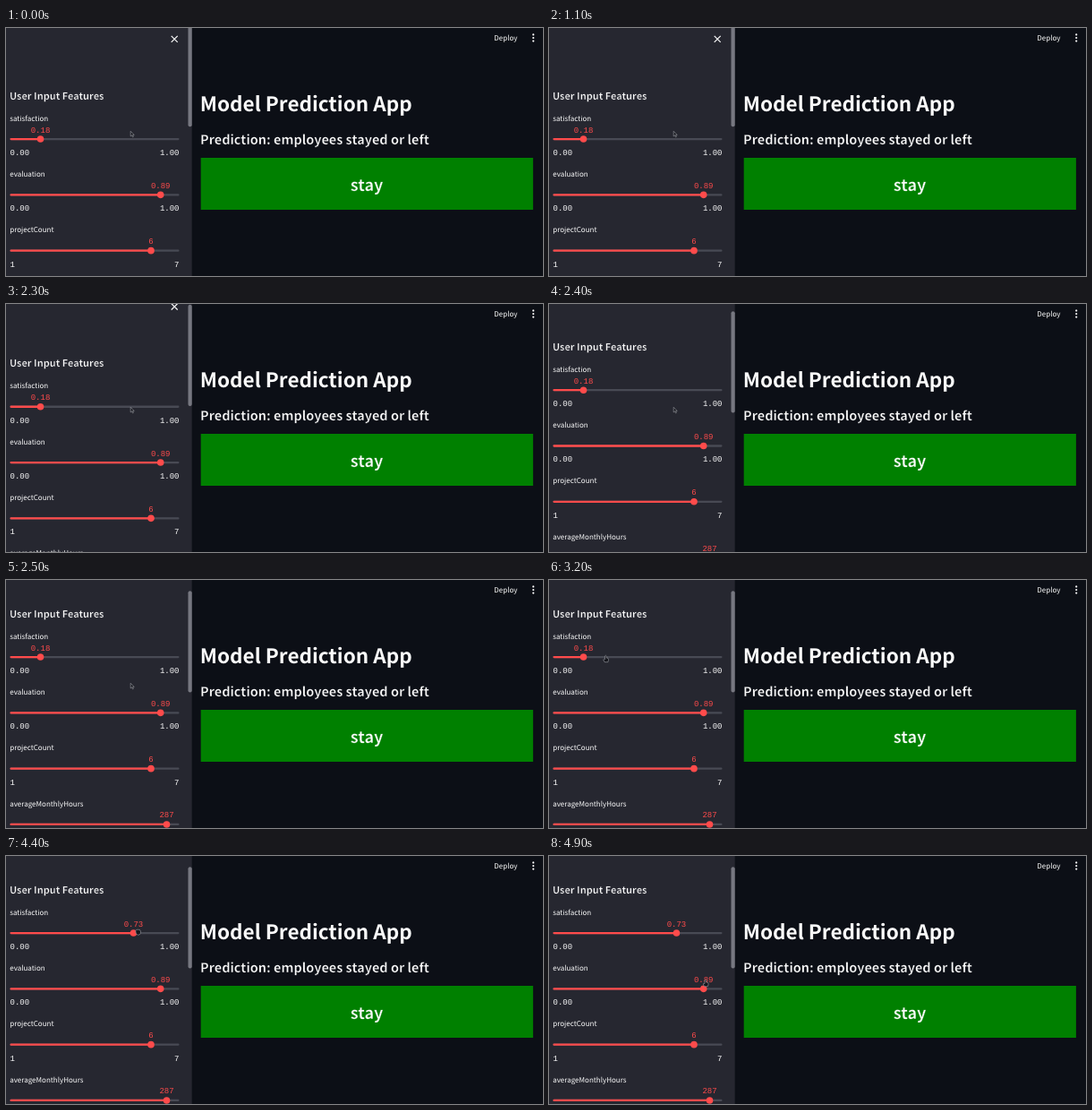
Recreate the animation shown at these times as an HTML page. Size 600 by 277 pixels, loop 5 s.

```html
<!DOCTYPE html>
<html lang="en">
<head>
<meta charset="utf-8">
<title>Model Prediction App</title>
<style>
  html, body { margin: 0; height: 100%; overflow: hidden; background: #0c0f16; }
  svg { display: block; width: 600px; height: 277px; }
  text {
    font: 8.03px "Noto Sans CJK JP", "Noto Sans CJK SC", "Open Sans", sans-serif;
    fill: #fafafa;
    text-rendering: geometricPrecision;
  }
  .bold { font-weight: 700; }
  /* Bold trimmed to semibold by a thin edge in the background colour */
  .semi { font-weight: 700; stroke-width: .3; }
  .mono { font: 9px "Liberation Mono", monospace; }
  .value { fill: #ff4b4b; text-anchor: middle; }
  .end { text-anchor: end; }
  .cursor { fill: #15161c; stroke: #a0a1a8; stroke-width: .6; stroke-linejoin: round; }
</style>
</head>
<body>
<svg viewBox="0 0 600 277">
  <rect width="600" height="277" fill="#0c0f16"/>
  <text x="545.3" y="14">Deploy</text>
  <g fill="#fafafa">
    <circle cx="589.2" cy="7.4" r="1.1"/>
    <circle cx="589.2" cy="11" r="1.1"/>
    <circle cx="589.2" cy="14.6" r="1.1"/>
  </g>
  <text class="bold" x="216.8" y="92.8" style="font-size:22.5px">Model Prediction App</text>
  <text class="semi" x="217" y="129.9" stroke="#0c0f16" style="font-size:14.46px">Prediction: employees stayed or left</text>
  <rect x="217.7" y="145" width="371.2" height="58" fill="#008000"/>
  <text class="semi" x="403.1" y="181.5" stroke="#008000" text-anchor="middle" style="font-size:18.1px">stay</text>

  <rect width="207.7" height="277" fill="#262730"/>
  <g id="panel">
    <path d="M184.7 8.8l7 7m0-7l-7 7" stroke="#fafafa" stroke-width="1.2"/>
    <text class="semi" x="4" y="79.7" stroke="#262730" style="font-size:10.95px">User Input Features</text>
  </g>
  <rect id="bar" x="203.5" y="-3" width="4.2" height="113.3" rx="2" fill="#777881"/>
  <path id="cursor" class="cursor"/>
</svg>
<script>
const LOOP = 5000, STEP = 100;
const LEFT = 4.5, WIDTH = 189, GAP = 62.3, SCROLL = 38;
const $ = id => document.getElementById(id);

const SHAPES = {
  arrow: "M0 0V5.6L1.4 4.5L2.3 6.5L3.2 6.1L2.3 4.1H4Z",
  hand: "M-1 1V-2.6Q-.2 -4 .6 -2.6V-.6L2.6 0Q3.2 .4 3 2L2.4 4.2H-1.4L-2.8 1.4Q-2.4 .4 -1 1Z",
  fist: "M-2.6 -1.4Q-2.2 -3 0 -2.8Q2.8 -3 3 -1V1.2Q2.4 3.2 0 3.2Q-2.8 2.8 -2.6 -1.4Z"
};

// Rows of time, cursor x, cursor y
const PATH = [
  [2700, 139.2, 115.3], [3200, 63.5, 87.5], [3300, 43, 85],
  [3900, 102, 85], [4400, 147.4, 85], [4500, 147.4, 85], [4900, 175, 141.5]
];
const DRAG = [[3300, .18], [3900, .49], [4400, .73]];

// Linear interpolation through keyed rows, held at both ends
function along(rows, t, col = 1) {
  if (t <= rows[0][0]) return rows[0][col];
  for (let i = 1; i < rows.length; i++) {
    const a = rows[i - 1], b = rows[i];
    if (t <= b[0]) return a[col] + (b[col] - a[col]) * (t - a[0]) / (b[0] - a[0]);
  }
  return rows[rows.length - 1][col];
}

function add(tag, attrs, label = "") {
  const el = document.createElementNS("http://www.w3.org/2000/svg", tag);
  for (const key in attrs) el.setAttribute(key, attrs[key]);
  el.textContent = label;
  return $("panel").appendChild(el);
}

function slider(row, name, min, max) {
  const y = row * GAP;
  const track = { x: LEFT, y: 122.9 + y, height: 2.3, rx: 1.1 };
  add("text", { x: 4.2, y: 103.7 + y }, name);
  add("rect", { ...track, width: WIDTH, fill: "#484a54" });
  const fill = add("rect", { ...track, fill: "#ff4b4b" });
  const knob = add("circle", { cy: 124.05 + y, r: 3.8, fill: "#ff4b4b" });
  const value = add("text", { class: "mono value", y: 116.5 + y });
  add("text", { class: "mono", x: LEFT, y: 142 + y }, min);
  add("text", { class: "mono end", x: LEFT + WIDTH, y: 142 + y }, max);
  return (part, label) => {
    const x = LEFT + part * WIDTH;
    fill.setAttribute("width", part * WIDTH);
    knob.setAttribute("cx", x);
    value.setAttribute("x", x);
    value.textContent = label;
  };
}

const satisfaction = slider(0, "satisfaction", "0.00", "1.00");
slider(1, "evaluation", "0.00", "1.00")(.89, "0.89");
slider(2, "projectCount", "1", "7")(5 / 6, "6");
slider(3, "averageMonthlyHours", "96", "310")(.926, "287");

function draw(now) {
  const t = Math.floor(now % LOOP / STEP) * STEP;

  const u = Math.min(1, Math.max(0, (t - 2205) / 295));
  const scroll = SCROLL * u * u * (3 - 2 * u);
  $("panel").setAttribute("transform", `translate(0 ${-scroll})`);
  $("bar").setAttribute("y", -3 + scroll * .4);

  const part = Math.round(along(DRAG, t) * 100) / 100;
  satisfaction(part, part.toFixed(2));

  const shape = t < 3100 ? "arrow" : t >= 3300 && t < 4500 ? "fist" : "hand";
  $("cursor").setAttribute("d", SHAPES[shape]);
  $("cursor").setAttribute("transform", `translate(${along(PATH, t)} ${along(PATH, t, 2)})`);
}

let start;
function tick(now) {
  start ??= now;
  draw(now - start);
  requestAnimationFrame(tick);
}
draw(0);
requestAnimationFrame(tick);
</script>
</body>
</html>
```
